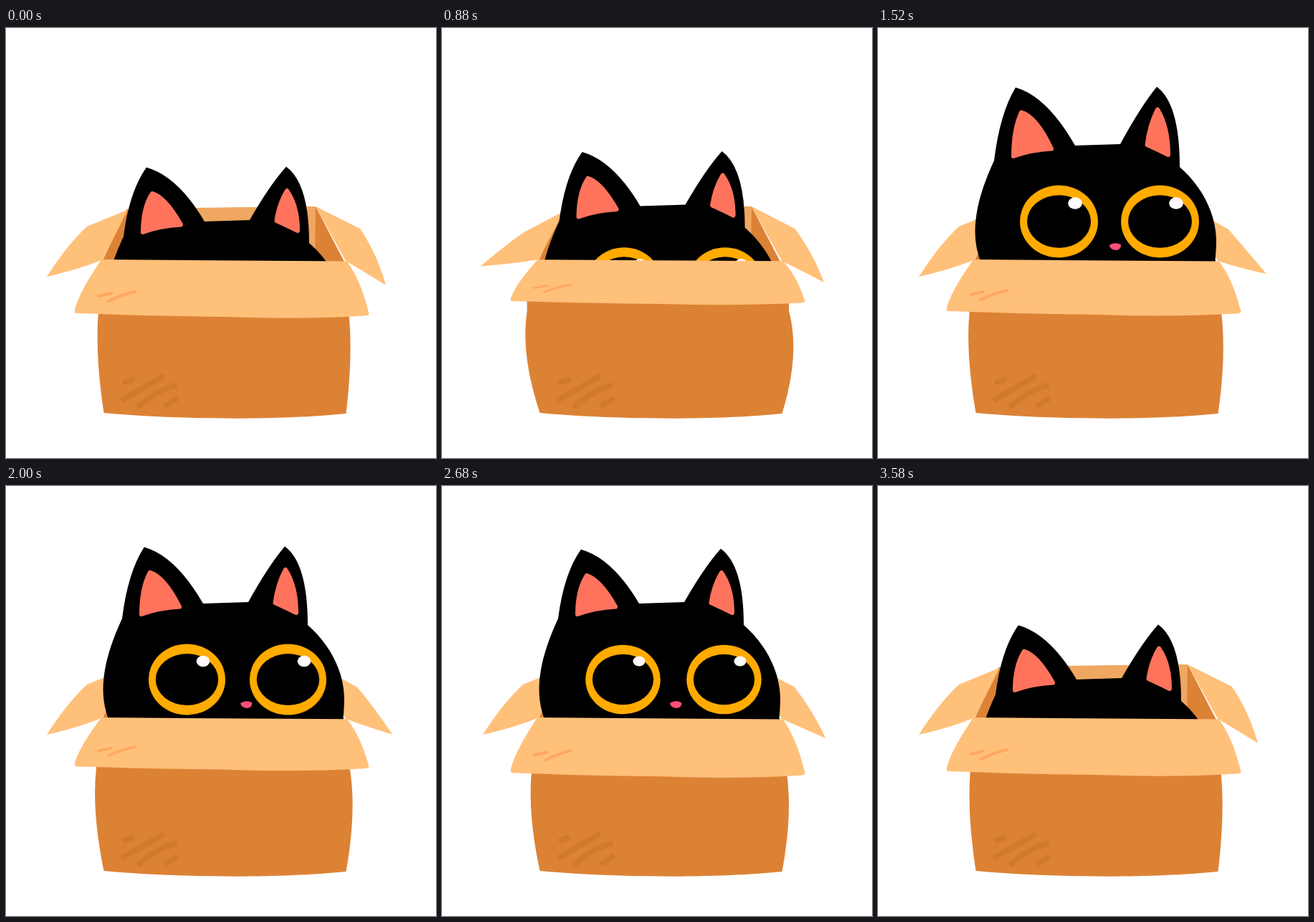
An HTML page for the animation above (3.6 s loop, 600 by 600 pixels).

```html
<!DOCTYPE html>
<html lang="en">
<head>
<meta charset="utf-8">
<title>Cat in a box</title>
<style>
  html, body { margin: 0; width: 100%; height: 100%; overflow: hidden; background: #fff; }
  svg { display: block; width: 100vw; height: 100vh; }
  .cardboard { fill: #dc8235; }
  .flap { fill: #ffc07a; }
  .scuff { fill: none; stroke-linecap: round; }
  #innerEars { fill: #ff735d; stroke: #ff735d; stroke-width: 6; stroke-linejoin: round; }
</style>
</head>
<body>
<svg viewBox="0 0 600 600">
  <path class="cardboard" d="M168 253 135 324 472 326 432 249Z"/>
  <path fill="#efa761" d="M180 252 432 249 431 330 180 330Z"/>
  <path id="leftFlap" class="flap"/>
  <path id="rightFlap" class="flap"/>
  <g id="cat">
    <path id="head"/>
    <path id="innerEars"/>
    <g id="eyes"></g>
    <path id="nose" fill="#ff4f7b" d="M-8-2Q0-7 8.500-2.500Q8 5 1 5Q-7 4-8-2Z"/>
  </g>
  <path id="panel" class="cardboard"/>
  <path class="scuff" stroke="#cf7a2d" stroke-width="8" d="M166 494 176 491M164 518 218 487M186 527Q212 505 235 499M224 526 237 518"/>
  <g id="frontFlap">
    <path class="flap" d="M133 323 476 325.500C493 350 501 376 506.500 399Q506 401 500 401.500Q410 407 306 403 200 402 98 398 95 398 96 393C102 370 120 343 133 323Z"/>
    <path class="scuff" stroke="#ffa85e" stroke-width="4" d="M129 374 147 370M143 381.500Q158 373 180 368"/>
  </g>
</svg>
<script>
const LOOP = 3600;
const $ = id => document.getElementById(id);
const draw = (id, d) => $(id).setAttribute('d', d);
const place = (node, transform) => node.setAttribute('transform', transform);
const clamp = u => Math.max(0, Math.min(1, u));

$('eyes').innerHTML = [252.5, 393.5].map(x => `
  <g transform="translate(${x} 270)">
    <g class="iris"><ellipse rx="52.2" ry="48.3" fill="#ffab00"/><ellipse rx="42.6" ry="35.2"/></g>
    <g transform="translate(22.500 -25.500)"><ellipse class="glint" rx="8.5" ry="7" fill="#fffafb"/></g>
  </g>`).join('');

// Straight rise to 1 at the peak, then straight back to 0.
const hump = (t, from, peak, to) =>
  clamp(Math.min((t - from) / (peak - from), (to - t) / (to - peak)));

const ease = (t, from, to) => {
  const u = clamp((t - from) / (to - from));
  return u * u * (3 - 2 * u);
};

function drawCat(drop, perk, nose) {
  const x = -2 * perk, y = -5.5 * perk, inner = -7.2 * perk;
  place($('cat'), `translate(${drop / 53} ${drop})`);
  draw('head', `M162 185Q170 ${122 + y / 2} ${194 + x} ${88.5 + y} ${238 + x} ${101 + y} 275 164L338 162
    Q366 ${113 + y / 2} 389 ${87.5 + y} 421 ${111 + y} 421 194C452 221 471 258 472 295Q472 310 470 330
    L145 330C132 300 128 258 162 185Z`);
  draw('innerEars', `M${202 + x} ${125 + inner}Q189 ${145 + inner / 2} 189 179 213 170 242 168.500
    221 ${131 + inner} ${202 + x} ${125 + inner}Z
    M390 ${121 + inner}Q379 ${139 + inner / 2} 375.500 163 391 170 405 177 405 ${142 + inner / 2} 390 ${121 + inner}Z`);
  for (const iris of document.querySelectorAll('.iris')) place(iris, `scale(${1 + 0.043 * perk})`);
  for (const glint of document.querySelectorAll('.glint')) place(glint, `scale(${1 + 0.16 * perk})`);
  place($('nose'), `translate(${nose} 305)`);
}

function drawBox(left, right, bulge, lift) {
  draw('leftFlap', `M170 ${253.5 + 4 * left}L113 ${277 + 18 * left}Q85 ${303 + 6 * left}
    ${57 - 7 * left} ${347 - 30 * left} ${105 - 4 * left} ${336 - 16 * left} 135 323Z`);
  draw('rightFlap', `M432 249 ${494 - 5 * right} ${280 + right}Q517 313
    ${530 + 12 * right} ${359 - 16 * right} ${495 + 10 * right} ${337 - 2 * right} 474 325Z`);
  draw('panel', `M${129 - 0.85 * bulge} 370V395Q${124 - 1.2 * bulge} 455 136.500 537
    C230 546 380 548 474.500 538Q${484.5 + 1.3 * bulge} 455 ${478 + 0.5 * bulge} 395V370Z`);
  place($('frontFlap'), `translate(0 324) scale(1 ${1 - lift / 75}) translate(0 -324)`);
}

function render(t) {
  const drop = 106 - 20 * clamp(t / 850) - 86 * ease(t, 850, 1250) + 106 * ease(t, 3160, 3560);
  const perk = 1.25 * hump(t, 950, 1250, 2700) + 1.4 * hump(t, 2230, 2400, 2670) + 1.9 * hump(t, 2720, 3000, LOOP);
  const nose = 326 + 11.6 * hump(t, 1000, 2280, 2460);
  drawCat(drop, perk, nose);

  const left = hump(t, 0, 330, 1400);
  const right = 1.25 * hump(t, 0, 330, 1020) + 1.15 * hump(t, 1020, 1200, LOOP);
  const bulge = 13 * hump(t, 0, 940, 1180) + 5.6 * hump(t, 1180, 2400, LOOP);
  const lift = 18.3 * hump(t, 0, 940, 1170) + 9.3 * hump(t, 1170, 2280, 2440) - 2.7 * hump(t, 2280, 2460, LOOP);
  drawBox(left, right, bulge, lift);
}

const start = performance.now();
function tick() {
  render((performance.now() - start) % LOOP);
  requestAnimationFrame(tick);
}
tick();
</script>
</body>
</html>
```
